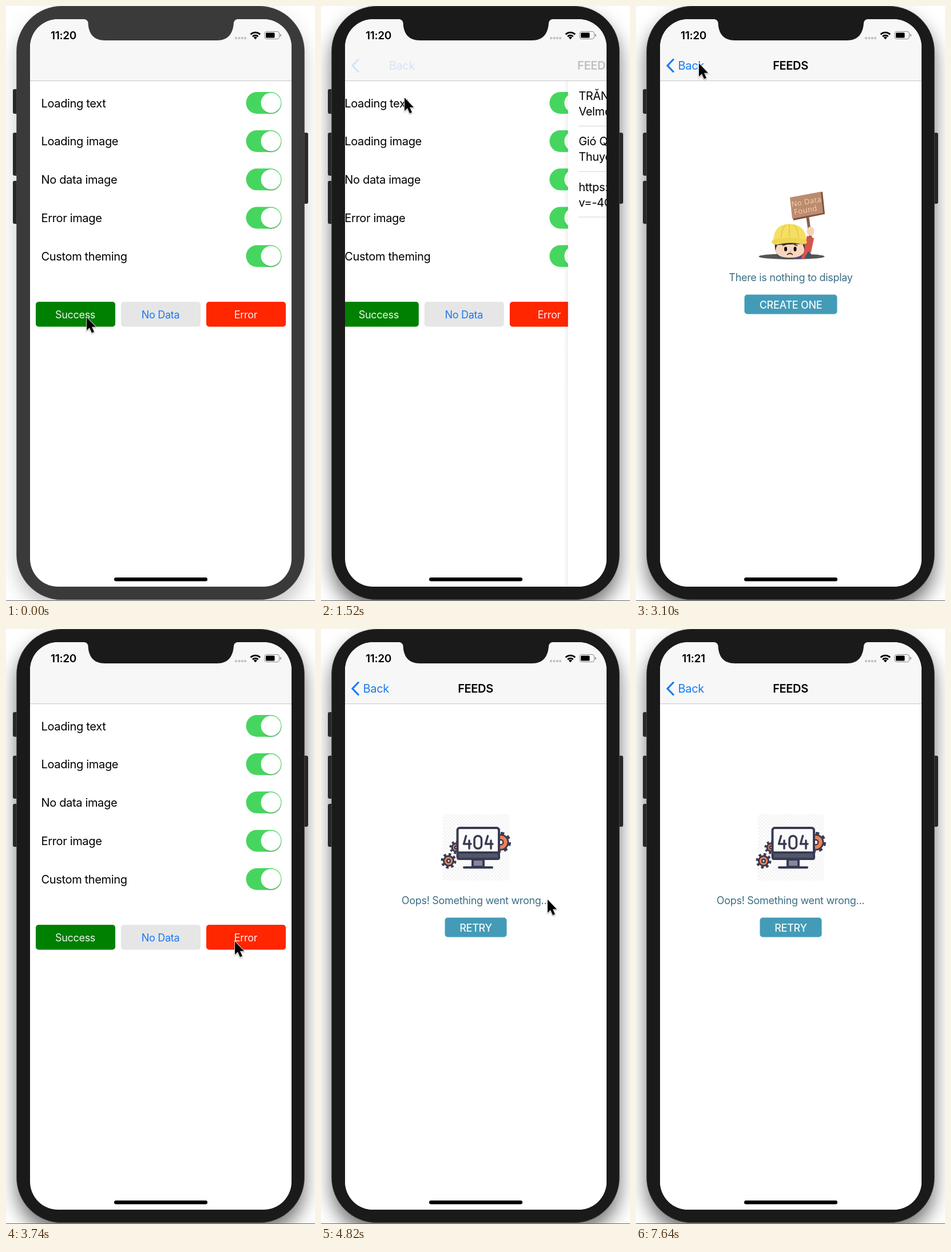
These frames come from a looping animation (540x1038 px, 7660 ms). An HTML page:

```html
<!DOCTYPE html>
<html lang="en">
<head>
<meta charset="utf-8">
<title>Feed states demo</title>
<style>
  html, body { margin: 0; width: 100%; height: 100%; overflow: hidden; background: #fff; }
  svg { display: block; width: 540px; height: 1038px; }
  text { font: 20px Inter, sans-serif; letter-spacing: -.017em; }
  .mid { text-anchor: middle; }
  .bold { font-weight: 600; }
  .small { font-size: 18px; }
  .time { font-size: 19px; }
  .teal { fill: #3b6e85; }
  .action { fill: #f2f9fb; font-weight: 500; }
  .sign { font: 13px "Open Sans", sans-serif; letter-spacing: .04em; }
  #phone { --body: #1a1a1a; --shade: #0000008c; fill: var(--body); }
  #phone.idle { --body: #3a3a3a; --shade: #00000038; }
  #body { filter: drop-shadow(0 18px 16px var(--shade)); }
  #cursor { filter: drop-shadow(0 1px 1px #0006); }
</style>
</head>
<body>
<svg viewBox="0 0 540 1038">
  <defs>
    <clipPath id="screen"><rect x="42" y="23" width="457" height="990" rx="49"/></clipPath>
    <linearGradient id="edge"><stop stop-opacity="0"/><stop offset="1" stop-opacity=".06"/></linearGradient>
    <pattern id="checks" width="6" height="6" patternUnits="userSpaceOnUse">
      <path d="M0 0h3v6h3V3H0z" fill="#f4f4f4"/>
    </pattern>
  </defs>

  <g id="phone">
    <rect id="body" x="18.5" width="503" height="1036" rx="79"/>
    <path d="M12 148q0-3 3-3h4v43h-4q-3 0-3-3zM12 224q0-3 3-3h4v75h-4q-3 0-3-3zM12 308q0-3 3-3h4v75h-4q-3 0-3-3zM521 221h4q3 0 3 3v118q0 3-3 3h-4z" fill="#282828"/>
    <rect x="18.5" y=".5" width="503" height="1035" rx="79" fill="none" stroke="#5559"/>
  </g>
  <path d="M0 1037.5H540" stroke="#666"/>

  <g clip-path="url(#screen)">
    <rect x="42" y="23" width="457" height="990" fill="#fff"/>
    <g id="home"></g>
    <g id="page">
      <rect x="34" y="130" width="8" height="890" fill="url(#edge)"/>
      <rect x="42" y="130" width="457" height="890" fill="#fff"/>
      <g id="list"></g>
      <g id="loading"><text class="mid small teal" x="270" y="480">Loading...</text></g>
      <g id="empty">
        <ellipse cx="272" cy="437" rx="57.500" ry="5" fill="#555"/>
        <path d="M284 440L293 421 299 401 311 405 306 429 296 441z" fill="#d9534a"/>
        <path d="M301 428l5 4-2 5-10 4z" fill="#36586b"/>
        <path d="M282 433h8l-2 8h-8z" fill="#44479a"/>
        <path d="M299.500 366L305 404" stroke="#8d5f48" stroke-width="5"/>
        <ellipse cx="305" cy="393" rx="6.500" ry="8" fill="#f7d3b6"/>
        <path d="M243 411Q241 430 250 437H288Q297 430 294 411z" fill="#2b2a2c"/>
        <path d="M247 417Q241 428 247 433 252 439 269 439 286 439 291 433 297 427 291 415z" fill="#f7d6bd"/>
        <path d="M240 409Q241 381 268 380 296 381 298 409z" fill="#f5df63"/>
        <path d="M237 411Q240 406 247 406 268 402 290 406 298 407 299 412 297 417 288 415 268 411 249 416 239 418 237 411z" fill="#f0d552"/>
        <path d="M254 404Q254 388 262 382M268 402V381M284 404Q283 388 275 382" fill="none" stroke="#e2c542" stroke-width="1.500"/>
        <path d="M256 418l6-2M276 416l6 2M264 434q5-5 10 0" fill="none" stroke="#35292a" stroke-width="1.700"/>
        <ellipse cx="261.500" cy="424" rx="2.500" ry="4"/><ellipse cx="278" cy="424" rx="2.500" ry="4"/>
        <circle cx="270" cy="428" r="1.500" fill="#e5aa90"/>
        <path d="M270 335L326 324 330 363 275 374z" fill="#80513f"/>
        <path d="M269 334L323 324 327 361 273 371z" fill="#bb8c6f"/>
        <g transform="rotate(-10 298 348)" class="sign" fill="#f8d0ab">
          <text class="sign mid" x="299" y="346">No Data</text>
          <text class="sign mid" x="295" y="360">Found</text>
        </g>
        <text class="mid small teal" x="270.500" y="480">There is nothing to display</text>
        <rect x="189.500" y="503.500" width="162" height="34" rx="5" fill="#439bb7"/>
        <text class="mid small action" x="270.500" y="527.500">CREATE ONE</text>
      </g>
      <g id="error">
        <rect x="213" y="323" width="116" height="116" fill="url(#checks)"/>
        <g id="gears"></g>
        <g stroke="#393b53" stroke-width="4" stroke-linejoin="round" stroke-linecap="round" fill="none">
          <path d="M265 402h19v13h-19z" fill="#85879b"/>
          <path d="M250 416H299"/>
          <rect x="238.500" y="347" width="72.500" height="54" rx="4" fill="#fbfbfb"/>
          <path d="M239 390h72v9q0 2-2 2h-68q-2 0-2-2z" fill="#51566b"/>
          <path d="M253.500 361L249.500 375H262M259 369V383M291.500 361L287.500 375H300M297 369V383" stroke-width="3.500"/>
          <rect x="268" y="361" width="12.500" height="22" rx="6" stroke-width="3.500"/>
        </g>
        <text class="mid small teal" x="270" y="480">Oops! Something went wrong...</text>
        <rect x="216.500" y="503.500" width="108" height="34" rx="5" fill="#439bb7"/>
        <text class="mid small action" x="270.500" y="527.500">RETRY</text>
      </g>
    </g>

    <rect x="42" y="23" width="457" height="107" fill="#f7f7f7"/>
    <path d="M42 130.500H499" stroke="#c8c8c8"/>
    <g id="back" fill="#157bf2">
      <path d="M66 92.500L55 104 66 115.500" fill="none" stroke="#157bf2" stroke-width="3.200"/>
      <text id="backText" x="73.500" y="111">Back</text>
    </g>
    <text id="title" class="mid bold" x="270" y="111">FEEDS</text>

    <text id="clock" class="mid bold time" x="100.500" y="58"></text>
    <g fill="#c4c4c4"><circle cx="402" cy="56" r="2.200"/><circle cx="407.500" cy="56" r="2.200"/><circle cx="412.800" cy="56" r="2.200"/><circle cx="418" cy="56" r="2.200"/></g>
    <path d="M427.500 49.500a11.800 11.800 0 0 1 16.600 0M431 53.200a6.800 6.800 0 0 1 9.600 0" fill="none" stroke="#000" stroke-width="2.800"/>
    <path d="M432.800 55a4.300 4.300 0 0 1 6 0l-3 3.200z"/>
    <rect x="452" y="44.500" width="25.500" height="13" rx="3.500" fill="none" stroke="#8a8a8a"/>
    <rect x="454" y="46.500" width="15.500" height="9" rx="1.500"/>
    <path d="M479 48.500q2 .5 2 2.500t-2 2.500z" fill="#8a8a8a"/>
    <rect x="189" y="997" width="163" height="6.500" rx="3.250"/>
  </g>
  <path id="notch" d="M132 22Q143 23 143.500 29C144 48 153 60 173 60H369C388 60 397 48 398 29Q398.500 23 409 22z"/>
  <path id="cursor" d="M0 0V23L5 18.200 9 27.300 13 25.500 9 16.800H16z" stroke="#fff" stroke-width="1.600" paint-order="stroke"/>
</svg>

<script>
const $ = id => document.getElementById(id);
const LOOP = 7660, SLIDE = 320, WIDTH = 457;

// Settings screen
const options = ['Loading text', 'Loading image', 'No data image', 'Error image', 'Custom theming'];
const buttons = [['Success', '#008000', '#edf5ed'], ['No Data', '#e6e6e6', '#1978f5'], ['Error', '#ff2600', '#fff0ed']];
$('home').innerHTML = options.map((label, i) => {
  const y = 169 + 66.8 * i;
  return `<text x="61.500" y="${y + 7.5}">${label}</text>
    <rect x="419.500" y="${y - 19}" width="62" height="38" rx="19" fill="#46d65f"/>
    <circle cx="464" cy="${y + 3}" r="17" fill="#0002"/>
    <circle cx="463" cy="${y}" r="17.500" fill="#fff"/>`;
}).join('') + buttons.map(([label, fill, ink], i) =>
  `<rect x="${52 + 149 * i}" y="516" width="139" height="43.500" rx="5" fill="${fill}"/>
   <text class="mid small" x="${121 + 149 * i}" y="544.500" fill="${ink}">${label}</text>`).join('');

// Feed rows
const feeds = [
  ['TRĂNG NGỦ BÊN HIÊN VẮNG', 'Velmo Quarl'],
  ['Gió Qua Đồi Sương Lạnh', 'Thuyên Lạc Khoai'],
  ['https://www.youtube.com/watch?', 'v=-4Cq0mR7xLk']
];
$('list').innerHTML = feeds.map((lines, i) => {
  const y = 164 + 79.3 * i;
  return lines.map((s, j) => `<text x="60.500" y="${y + 27 * j}">${s}</text>`).join('') +
    `<path d="M60 ${y + 45.5}H499" stroke="#d4d4d4"/>`;
}).join('');

const gear = (x, y, r, tooth) => {
  const ring = (width, color) => `<circle cx="${x}" cy="${y}" r="${r + tooth / 2}" fill="none"
    stroke="${color}" stroke-width="${width}" pathLength="16" stroke-dasharray="1"/>`;
  return ring(tooth + 1, '#393b53') +
    `<circle cx="${x}" cy="${y}" r="${r}" fill="#ef8154" stroke="#393b53" stroke-width="3"/>
     <circle cx="${x}" cy="${y}" r="${r / 3}" fill="#fbfbfb" stroke="#393b53" stroke-width="2.500"/>`;
};
$('gears').innerHTML = gear(314, 372, 13, 4.5) + gear(236, 381, 7, 4) + gear(223, 404.5, 8.5, 4.5);

const dots = ['#db5258', '#f67a56', '#f8ab60', '#a2b976'].map((fill, i) => {
  const dot = document.createElementNS('http://www.w3.org/2000/svg', 'circle');
  dot.setAttribute('cx', 239.5 + 20.7 * i);
  dot.setAttribute('r', 7.5);
  dot.setAttribute('fill', fill);
  $('loading').append(dot);
  return dot;
});

// Visits to the feed page: [push, pop]
const visits = [[160, 1370], [2000, 3140], [3790, Infinity]];
const states = [[0, 'loading'], [800, 'list'], [2000, 'loading'], [2640, 'empty'],
  [3790, 'loading'], [4430, 'error'], [5420, 'loading'], [6060, 'error']];
// Pointer path: [time, x, y]
const pointer = [[0, 141, 543], [240, 141, 543], [850, 100, 104], [1390, 100, 104], [1520, 146, 160],
  [1860, 270, 543], [2100, 270, 543], [2800, 110, 100], [3180, 110, 100], [3640, 400, 545],
  [4300, 400, 545], [4820, 396, 472], [5250, 288, 512], [6300, 288, 512], [6900, 300, -40]];

const clamp = v => Math.max(0, Math.min(1, v));
const easeOut = v => 1 - (1 - clamp(v)) ** 3;
const move = (id, x, y = 0) => $(id).setAttribute('transform', `translate(${x} ${y})`);

function pointerAt(t) {
  const i = pointer.findIndex(p => p[0] > t);
  if (i < 0) return pointer.at(-1).slice(1);
  const [t0, x0, y0] = pointer[i - 1], [t1, x1, y1] = pointer[i];
  const u = (t - t0) / (t1 - t0), k = u * u * (3 - 2 * u);
  return [x0 + (x1 - x0) * k, y0 + (y1 - y0) * k];
}

function draw(t) {
  const idle = t < 100;
  $('phone').classList.toggle('idle', idle);
  $('notch').setAttribute('fill', idle ? '#3a3a3a' : '#1a1a1a');
  $('clock').textContent = t < 6300 ? '11:20' : '11:21';

  const shown = visits.reduce((sum, [push, pop]) =>
    sum + easeOut((t - push) / SLIDE) - easeOut((t - pop) / SLIDE), 0);
  const hidden = 1 - shown;
  move('home', -.3 * WIDTH * shown);
  move('page', WIDTH * hidden);
  move('backText', 53 * hidden);
  move('title', 245 * hidden);
  $('back').setAttribute('opacity', shown);
  $('title').setAttribute('opacity', clamp(shown * 1.5));
  $('page').style.display = shown > 0 ? '' : 'none';

  const state = states.findLast(s => s[0] <= t)[1];
  for (const id of ['list', 'loading', 'empty', 'error'])
    $(id).style.display = id === state ? '' : 'none';

  dots.forEach((dot, i) => {
    const phase = (t - 110 - 90 * i + 480) % 480;
    dot.setAttribute('cy', 397 - 22 * Math.sin(Math.PI * clamp(phase / 180)));
  });
  move('cursor', ...pointerAt(t));
}

const start = performance.now();
(function tick() {
  draw((performance.now() - start) % LOOP);
  requestAnimationFrame(tick);
})();
</script>
</body>
</html>
```
